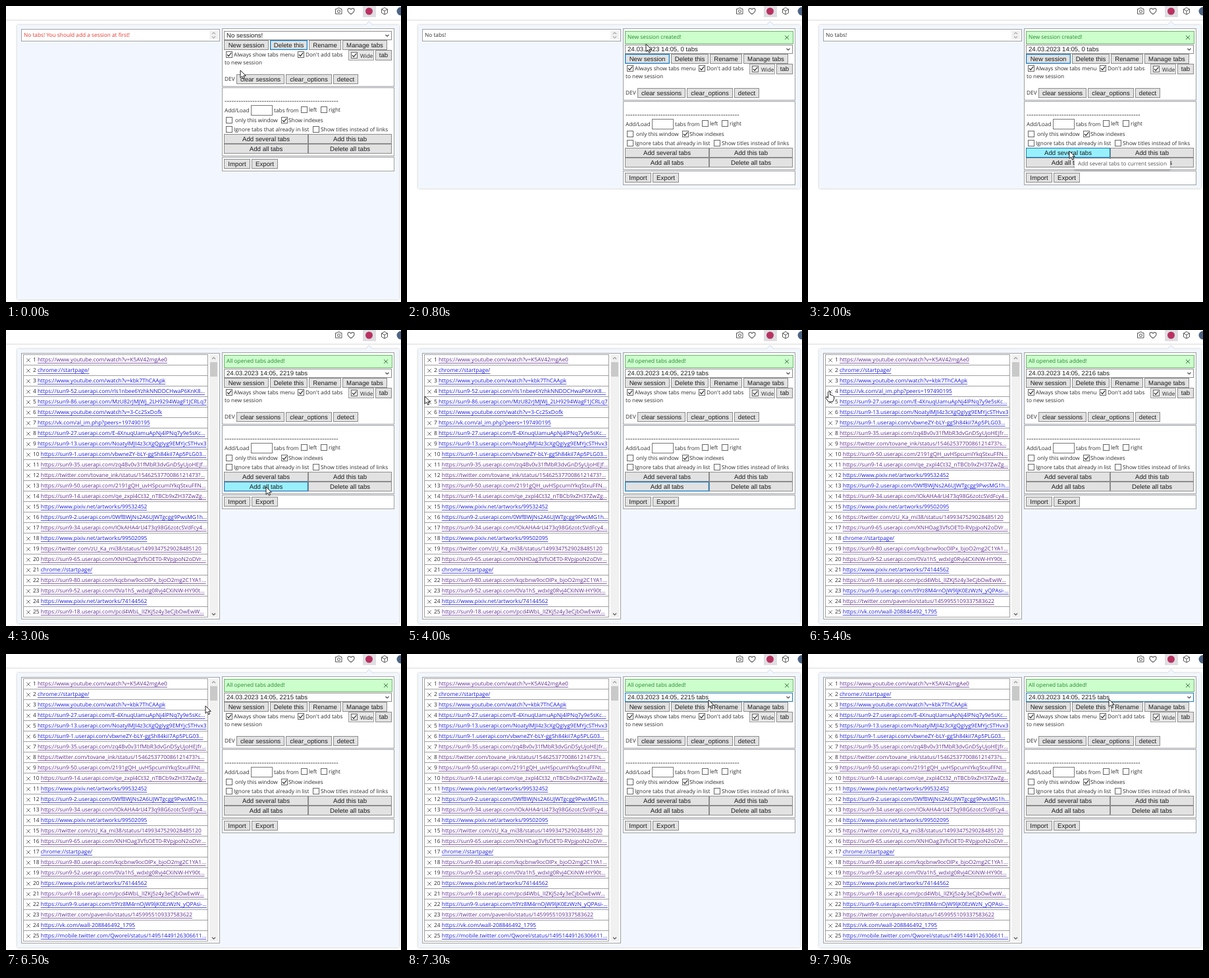
Recreate the animation shown at these times as an HTML page with a canvas. Size 600 by 451 pixels, loop 8 s.

```html
<!DOCTYPE html>
<html lang="en">
<head>
<meta charset="utf-8">
<title>Tab sessions</title>
<style>
html, body { margin: 0; width: 100%; height: 100%; overflow: hidden; background: #fff; }
canvas { display: block; }
</style>
</head>
<body>
<canvas id="stage" width="600" height="451"></canvas>
<script>
const ctx = document.getElementById('stage').getContext('2d');
const LOOP = 8000;
const UI = '8.3px "Open Sans", sans-serif';
const LINK = '8.4px "Open Sans", sans-serif';
const CONTROL = '9.67px "Liberation Sans", Arial, sans-serif';
const GRAY = '#8c8c8c', SOFT = '#a0a0a0', FOCUS = '#1479bd', HOVER = '#99f0fd';
const BLUE = '#1c1cd8', PURPLE = '#603090';

// A leading "*" marks a link that was visited before.
const links = `*https://www.youtube.com/watch?v=K5AV42mgAe0
chrome://startpage/
https://www.youtube.com/watch?v=kbk7ThCAApk
https://sun9-52.userapi.com/rls1nbee6YzhkNNDDCHwaP6KnK8Lw2
https://sun9-86.userapi.com/MzU82rJMJWj_2LH9294WagF1JCRLq7
https://www.youtube.com/watch?v=3-Cc2SxDofk
https://vk.com/al_im.php?peers=197490195
https://sun9-27.userapi.com/E-4XnuqUamuApNj4lPNq7y9e5sKc8d4
https://sun9-13.userapi.com/NoatylMJI4z3cXgQgIyg9EMYjcSTHvx3
https://sun9-1.userapi.com/vbwneZY-bLY-ggSh84kiI7Ap5PLG03Qeh
*https://sun9-35.userapi.com/zq4Bv0v31fMbR3dvGnDSyUjoHEJfrPkw
*https://twitter.com/tovane_ink/status/1546253770086121473?s=20
*https://sun9-50.userapi.com/2191gQH_uvHSpcumIYkqStxuFFNtpab
*https://sun9-14.userapi.com/qe_zxpl4Ct32_nTBCb9xZH37ZwZgxrm
https://www.pixiv.net/artworks/99532452
https://sun9-2.userapi.com/0WfBWjNs2A6UJWTgcgg9PwsMG1hxd4
*https://sun9-34.userapi.com/IOkAHA4rU473q98G6zotcSVdFcy4b2
https://www.pixiv.net/artworks/99502095
*https://twitter.com/zU_Ka_mi38/status/1499347529028485120
*https://sun9-65.userapi.com/XNHOag3VfsOET0-RVpjpoN2oDVrs8k
chrome://startpage/
*https://sun9-80.userapi.com/kqcbnw9ocOlPx_bjoO2mg2C1YA1v6n
*https://sun9-52.userapi.com/0Va1hS_wdxIg0Rvj4CXiNW-HY90tncq
https://www.pixiv.net/artworks/74144562
*https://sun9-18.userapi.com/pcd4WbL_lIZKj5z4y3eCjbOwEwW3tm
https://sun9-9.userapi.com/t9Yz8M4rnOjW9ljK0EzWzN_yQPAsi-xe
*https://twitter.com/pavenilo/status/1459955109337583622
https://vk.com/wall-208846492_1795
https://mobile.twitter.com/Qworel/status/1495144912630661120`.split('\n');

const deletions = [4400, 4700, 5000, 5600];
const FIRST_DELETED = 3;

// Pointer path: time, x, y
const path = [
  [0, 356, 98], [200, 363, 58], [1200, 363, 58], [1800, 397, 221], [2000, 397, 221],
  [2300, 395, 239], [3100, 395, 239], [4000, 27, 101], [4200, 27, 101], [4300, 32, 95],
  [5100, 32, 95], [5300, 32, 93], [6000, 32, 93], [6500, 303, 79], [6900, 459, 75],
  [7000, 460, 68], [7300, 458, 70], [7600, 458, 70], [7900, 457, 69]
];

function pointerAt(t) {
  const next = path.findIndex(p => p[0] > t);
  if (next < 0) return path.at(-1).slice(1);
  const [t0, x0, y0] = path[next - 1], [t1, x1, y1] = path[next];
  const k = (t - t0) / (t1 - t0);
  return [x0 + (x1 - x0) * k, y0 + (y1 - y0) * k];
}

function box(x, y, w, h, fill = '#fff', border = GRAY) {
  ctx.fillStyle = border;
  ctx.fillRect(x, y, w, h);
  ctx.fillStyle = fill;
  ctx.fillRect(x + 1, y + 1, w - 2, h - 2);
}

function text(s, x, y, color = '#2c2c2c', font = UI, align = 'left') {
  ctx.font = font;
  ctx.fillStyle = color;
  ctx.textAlign = align;
  ctx.fillText(s, x, y);
}

function stroke(d, color, width = 1, fill) {
  const p = new Path2D(d);
  if (fill) { ctx.fillStyle = fill; ctx.fill(p); }
  ctx.strokeStyle = color;
  ctx.lineWidth = width;
  ctx.stroke(p);
}

const cross = (x, y, r, color) =>
  stroke(`M${x - r} ${y - r}l${2 * r} ${2 * r}M${x + r} ${y - r}l${-2 * r} ${2 * r}`, color, 0.9);
const chevron = (x, y, dir, color, r = 2.5) =>
  stroke(`M${x - r} ${y - dir * r / 2}l${r} ${dir * r}l${r} ${-dir * r}`, color, 1.1);

function checkbox(x, y, label, labelX, checked) {
  box(x, y, 10, 10, '#fff', '#666');
  if (checked) stroke(`M${x + 2} ${y + 5}l2.2 2.3l4 -5`, '#222', 1.1);
  text(label, labelX, y + 6);
}

function drawToolbar() {
  ctx.fillStyle = '#d9d9d9';
  ctx.fillRect(0, 21, 600, 1);
  ctx.fillStyle = '#dedee2';
  ctx.fillRect(542, 0, 20, 17);
  stroke('M501 4.5h2l1 -1.5h3l1 1.5h2v7.5h-9.5v-7.5zM507.5 8a2 2 0 1 1 -4 0a2 2 0 1 1 4 0', '#555');
  stroke('M524 12.5C515 6.5 520 1 524 5C528 1 533 6.5 524 12.5z', '#555', 1.1);
  stroke('M575 2.5l4.5 2.5v5.5l-4.5 2.5l-4.5 -2.5v-5.5zM570.5 5l4.5 2.5l4.5 -2.5M575 7.5v5.5', '#555');
  for (const [x, r, color] of [[551.5, 5.5, '#b83260'], [600, 6.5, '#4d6484']]) {
    ctx.fillStyle = color;
    ctx.beginPath();
    ctx.arc(x, 8, r, 0, 7);
    ctx.fill();
  }
}

function drawPopup(bottom) {
  ctx.save();
  ctx.shadowColor = '#0004';
  ctx.shadowBlur = 3;
  ctx.fillStyle = '#f2f7ff';
  ctx.fillRect(17, 29, 580, bottom - 29);
  ctx.restore();
  stroke('M546 29l5.5 -6l5.5 6', '#d4d8df', 1, '#f2f7ff');
}

function drawLink(index, link) {
  const y = 38 + index * 16, cy = y + 8;
  const color = link[0] === '*' ? PURPLE : BLUE;
  const label = `${index + 1} `;
  box(26, y - 1, 281, 17, '#fff', SOFT);
  cross(34, cy, 2.8, '#666');
  text(label, 41, cy, '#2c2c2c', LINK);
  const x = 41 + ctx.measureText(label).width;
  let url = link.replace('*', ''), shown = url;
  while (x + ctx.measureText(shown).width > 305.5) {
    url = url.slice(0, -1);
    shown = url + '…';
  }
  text(shown, x, cy, color, LINK);
  ctx.globalAlpha = 0.75;
  ctx.fillRect(x, cy + 4, ctx.measureText(shown).width, 1);
  ctx.globalAlpha = 1;
}

function drawList(t, removed) {
  const full = t >= 3000;
  const bottom = full ? 441 : 54;
  box(23, 35, 302, bottom - 35, '#fff', SOFT);
  ctx.fillStyle = '#f1f1f1';
  ctx.fillRect(309, 38, 13, bottom - 41);
  const arrow = full ? '#555' : '#aaa';
  chevron(315.5, full ? 43 : 41.5, -1, full ? '#999' : arrow);
  chevron(315.5, full ? 433 : 47.5, 1, arrow);
  if (full) {
    ctx.fillStyle = '#c9c9c9';
    ctx.fillRect(310, 49, 11, 22);
    const rows = links.filter((_, i) => i < FIRST_DELETED || i >= FIRST_DELETED + removed);
    rows.slice(0, 25).forEach((link, i) => drawLink(i, link));
  } else if (t < 800) {
    text('No tabs! You should add a session at first!', 27, 45, '#e5352b');
  } else {
    text('No tabs!', 27, 45);
  }
}

function drawControls(t, removed, mx, my) {
  const shift = t < 800 ? 0 : 21;
  const focused = t < 600 ? 'Delete this' : t < 2700 ? 'New session'
    : t < 4300 ? 'Add all tabs' : '';
  const inside = (x, y, w, h) => mx >= x && mx < x + w && my >= y && my < y + h;

  function button(label, x, y, w, h = 15) {
    const hover = inside(x, y + shift, w, h);
    const lit = hover || label === focused;
    box(x, y, w, h, hover ? HOVER : '#e2e2e2', lit ? FOCUS : GRAY);
    if (label === focused) {
      ctx.strokeStyle = '#a9cbe6';
      ctx.lineWidth = 1;
      ctx.strokeRect(x + 1.5, y + 1.5, w - 3, h - 3);
    }
    text(label, x + w / 2, y + h / 2 + 0.5, '#1c1c1c', CONTROL, 'center');
  }

  box(328, 34, 262, 89 + shift, '#fff', SOFT);
  if (shift) {
    box(331, 38, 256, 20, '#ccffcc', '#6ab46a');
    text(t < 3000 ? 'New session created!' : 'All opened tabs added!', 335, 48, '#25862d');
    cross(577, 48, 3, '#25772b');
  }

  ctx.save();
  ctx.translate(0, shift);
  const count = t < 3000 ? 0 : 2219 - removed;
  box(331, 38, 255, 14, '#fff', inside(331, 38 + shift, 255, 14) ? FOCUS : GRAY);
  text(shift ? `24.03.2023 14:05, ${count} tabs` : 'No sessions!', 335, 45, '#1c1c1c', CONTROL);
  chevron(579, 45, 1, '#444');

  button('New session', 331, 52, 68);
  button('Delete this', 401, 52, 57);
  button('Rename', 460, 52, 49);
  button('Manage tabs', 511, 52, 68);
  checkbox(334, 69, 'Always show tabs menu', 346, true);
  checkbox(443, 69, "Don't add tabs", 455, true);
  box(520, 67, 39, 16, '#e8e8e8', SOFT);
  checkbox(524, 70, '', 538, true);
  text('Wide', 538, 77);
  button('tab', 561, 67, 25, 16);
  text('to new session', 332, 87);
  text('DEV', 332, 112);
  button('clear sessions', 350, 104, 73);
  button('clear_options', 425, 104, 70);
  button('detect', 497, 104, 38);

  box(328, 124, 262, 105, '#fff', SOFT);
  text('-'.repeat(49), 332, 145.5, '#2c2c2c', '10.6px "Liberation Sans", Arial, sans-serif');
  text('Add/Load', 332, 160);
  box(372, 151, 33, 16, '#fff', '#777');
  text('tabs from', 407, 160);
  checkbox(448, 153, 'left', 460);
  checkbox(478, 153, 'right', 490);
  checkbox(334, 169, 'only this window', 348);
  checkbox(418, 169, 'Show indexes', 429, true);
  checkbox(334, 183, 'Ignore tabs that already in list', 346);
  checkbox(466, 183, 'Show titles instead of links', 478);
  button('Add several tabs', 331, 195, 128);
  button('Add this tab', 459, 195, 127);
  button('Add all tabs', 331, 210, 128);
  button('Delete all tabs', 459, 210, 127);

  box(328, 230, 262, 22, '#fff', SOFT);
  button('Import', 331, 233, 40);
  button('Export', 373, 233, 40);
  ctx.restore();
}

function drawTooltip(label, x, y) {
  ctx.font = UI;
  const width = ctx.measureText(label).width + 10;
  ctx.save();
  ctx.shadowColor = '#0005';
  ctx.shadowBlur = 3;
  ctx.shadowOffsetY = 1;
  ctx.fillStyle = '#fff';
  ctx.fillRect(x, y, width, 16);
  ctx.restore();
  text(label, x + 5, y + 8, '#555');
}

function drawPointer(x, y, hand) {
  ctx.save();
  ctx.translate(x, y);
  if (hand) {
    stroke('M-1.5 8V1.5Q0 -.5 1.5 1.5V6Q3 5 4 6.6Q5.5 6 6.2 7.4Q7.5 7.5 7.5 9V12L5.5 16.5H-1L-4.8 10.5Q-4.5 8 -1.5 10.5z',
      '#222', 1, '#fff');
  } else {
    stroke('M0 0V11.5L2.7 9L4.6 13.2L6.5 12.3L4.7 8.3H8.3z', '#222', 1, '#fff');
  }
  ctx.restore();
}

function draw(t) {
  const [mx, my] = pointerAt(t);
  const removed = deletions.filter(time => t >= time).length;
  ctx.textBaseline = 'middle';
  ctx.textRendering = 'geometricPrecision';
  ctx.fillStyle = '#fff';
  ctx.fillRect(0, 0, 600, 451);
  drawToolbar();
  drawPopup(t >= 800 && t < 3000 ? 278 : 447);
  drawList(t, removed);
  drawControls(t, removed, mx, my);
  if (t === 2000) drawTooltip('Add several tabs to current session', 405, 233);
  if (t >= 2500 && t < 3000) drawTooltip('Add all tabs to current session', 403, 251);
  drawPointer(mx, my, t >= 4300 && t <= 6000);
}

function tick(now) {
  draw(Math.floor(now % LOOP / 100) * 100);
  requestAnimationFrame(tick);
}
requestAnimationFrame(tick);
</script>
</body>
</html>
```
